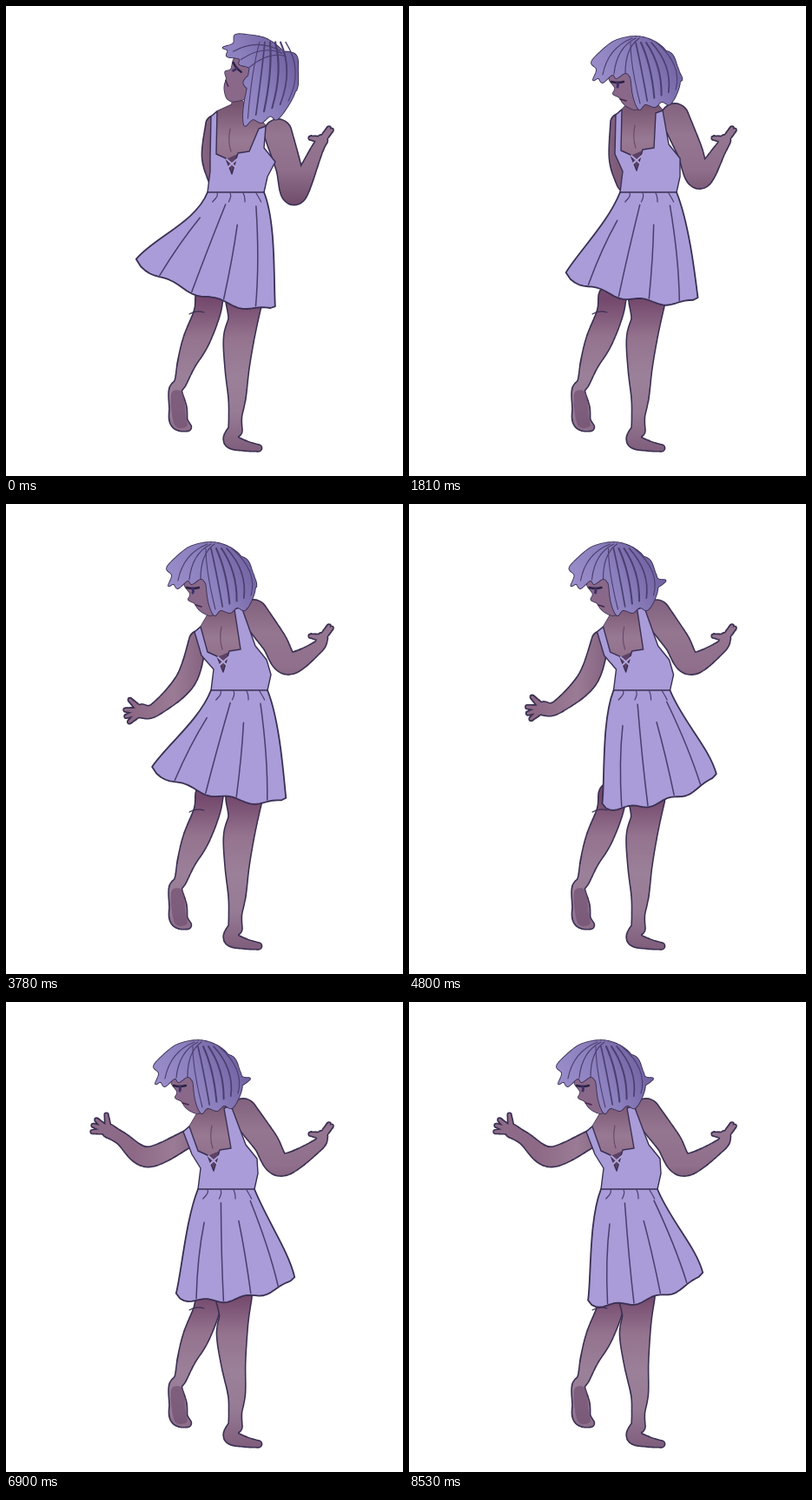
Animation, 457 px wide and 540 px high, one loop 8660 ms. Source, as an HTML page with a canvas:

```html
<!DOCTYPE html>
<html lang="en">
<head>
<meta charset="utf-8">
<title>Turning dancer</title>
<style>
html, body { margin: 0; width: 100%; height: 100%; overflow: hidden; background: #fff; }
canvas { display: block; width: 457px; height: 540px; }
</style>
</head>
<body>
<canvas id="stage" width="457" height="540"></canvas>
<script>
const ctx = document.getElementById('stage').getContext('2d');
const LOOP = 8660, HOLD = 130, STEP = 82.8, SWAY = 1828;
const INK = '#3a2f52', DRESS = '#a99cd8', FOLD = '#4a3d6d';

// Key joints in four poses: back turned, shoulder raised, arm out low, arm out high
const joints = {
  head: [[292, 84], [267, 76], [242, 85], [227, 85]],
  strapL: [[236, 127], [238, 125], [217, 147], [204, 149]],
  strapR: [[299, 138], [292, 120], [271, 118], [259, 119]],
  notch: [[260, 193], [262, 189], [250, 193], [239, 194]],
  waist: [[264, 214], [275, 214], [268, 214], [253, 215]],
  elbowL: [[237, 172], [242, 175], [207, 202], [163, 178]],
  wristL: [[240, 198], [246, 202], [172, 236], [133, 157]],
  palmL: [[244, 203], [250, 206], [156, 238], [118, 148]],
  elbowR: [[333, 215], [335, 197], [325, 183], [317, 187]]
};
const turns = [[130, 930], [1950, 2533], [4670, 5550]];

const lerp = (a, b, k) => a + (b - a) * k;
const along = (a, b, k) => a.map((v, i) => lerp(v, b[i], k));
const shift = ([x, y], dx, dy) => [x + dx, y + dy];
const polar = ([x, y], angle, r) => [x + r * Math.cos(angle), y + r * Math.sin(angle)];
const heading = (a, b) => Math.atan2(b[1] - a[1], b[0] - a[0]);
const clamp = v => Math.min(1, Math.max(0, v));
const ease = (t, [a, b]) => { const k = clamp((t - a) / (b - a)); return k * k * (3 - 2 * k); };

function poseAt(t) {
  const turn = turns.reduce((sum, span) => sum + ease(t, span), 0);
  const i = Math.min(2, Math.floor(turn));
  const pose = { turn };
  for (const name in joints) pose[name] = along(joints[name][i], joints[name][i + 1], turn - i);
  return pose;
}

// -1 blows the skirt fully left, 1 fully right; a first gust dies away
const swayAt = t => .28 - .85 * Math.cos(2 * Math.PI * (t / SWAY - .083)) - .55 * Math.exp(-t / 400);

const spline = (a, b, c, d, k) =>
  b + k * (c - a + k * (2 * a - 5 * b + 4 * c - d + k * (3 * (b - c) + d - a))) / 2;

function blob(p) {
  const path = new Path2D(), n = p.length;
  const at = i => p[(i + n) % n];
  p.forEach((_, i) => {
    for (let k = 0; k < 1; k += .1) {
      path.lineTo(...[0, 1].map(c => spline(at(i - 1)[c], at(i)[c], at(i + 1)[c], at(i + 2)[c], k)));
    }
  });
  path.closePath();
  return path;
}

function poly(p) {
  const path = new Path2D();
  p.forEach(q => path.lineTo(...q));
  path.closePath();
  return path;
}

function ink(path, width = 1.4, color = INK) {
  ctx.strokeStyle = color;
  ctx.lineWidth = width;
  ctx.stroke(path);
}

function paint(path, fill, width = 1.6) {
  ink(path, width * 2);
  ctx.fillStyle = fill;
  ctx.fill(path);
}

function bend(a, b, c, width, color) {
  const path = new Path2D();
  path.moveTo(...a);
  path.quadraticCurveTo(...b, ...c);
  ink(path, width, color);
}

function shade(x0, y0, x1, y1, ...colors) {
  const g = ctx.createLinearGradient(x0, y0, x1, y1);
  colors.forEach((c, i) => g.addColorStop(i / (colors.length - 1), c));
  return g;
}

// Union of round tubes; each joint is x, y, radius
function limb(chains, fill) {
  [[.9, INK], [-.7, fill]].forEach(([grow, color]) => {
    const path = new Path2D();
    for (const chain of chains) {
      const at = i => chain[Math.min(chain.length - 1, Math.max(0, i))];
      for (let i = 0; i < chain.length - 1; i++) {
        for (let k = 0; k <= 1; k += .04) {
          const [x, y, r] = [0, 1, 2].map(c =>
            spline(at(i - 1)[c], at(i)[c], at(i + 1)[c], at(i + 2)[c], k));
          path.moveTo(x + r + grow, y);
          path.arc(x, y, r + grow, 0, 7);
        }
      }
    }
    ctx.fillStyle = color;
    ctx.fill(path);
  });
}

const fingers = (palm, angle, fan, reach) =>
  fan.map(f => [[...palm, 4], [...polar(palm, angle + f, reach), 2.2]]);

function drawLegs({ turn }) {
  const skin = shade(0, 338, 0, 510, '#74496d', '#94738e', '#9b8099', '#977b95', '#7f5e7c');
  limb([[[234, 335, 16], [231, 354, 15], [219, 384, 15], [208, 410, 10.5], [201, 432, 7],
    [195, 442, 7.5], [198, 462, 10], [199, 477, 10], [209, 484, 4.5]]], skin);
  const sole = [[190, 446], [203, 444], [207, 470], [208, 483], [194, 481]];
  ctx.fillStyle = '#6c4a6d99';
  ctx.fill(blob(sole));

  const step = 12 * clamp(turn - 2);
  const lean = ([x, y, r]) => [x - step * clamp((455 - y) / 110), y, r];
  const leg = [[274, 338, 21], [273, 360, 17], [268, 382, 17.5], [266, 415, 14], [266, 450, 10],
    [264, 472, 7.5], [264, 488, 8]];
  limb([leg.map(lean), [[264, 485, 7], [259, 499, 8.5], [274, 505, 6], [291, 508, 3.8]]], skin);
  bend([211, 354], [219, 349], [228, 352], 1.1);
}

function drawArms({ strapL, elbowL, wristL, palmL, strapR, elbowR, notch }) {
  const skinL = shade(100, 0, 240, 0, '#8d6c89', '#8d6986', '#9a7b95', '#7d5b79');
  limb([
    [[...shift(strapL, 4, 9), 10], [...elbowL, 11.5], [...wristL, 7.5], [...palmL, 8]],
    ...fingers(palmL, heading(wristL, palmL), [-.6, -.2, .2, .9], 19)
  ], skinL);

  const corner = shift(notch, 20, -26);
  const back = [strapL, shift(strapL, 7, -6), shift(along(strapL, strapR, .38), 0, -18),
    shift(along(strapL, strapR, .4), 0, -32), shift(along(strapL, strapR, .8), 0, -14), strapR,
    corner, notch, shift(notch, -18, -22)];
  paint(poly(back), shade(0, 112, 0, 195, '#76536f', '#987994', '#8a6883'), .7);
  bend(shift(notch, -2, -52), shift(notch, -5, -38), shift(notch, -1, -26), 1.2, '#6a4a6b');

  const wrist = [358, 165], palm = [364, 154];
  const skinR = shade(0, 108, 0, 228, '#80607c', '#957691', '#8f6f8b', '#704d6b');
  limb([
    [[...shift(strapR, 14, 8), 16], [...along(shift(strapR, 16, 8), elbowR, .55), 14.5],
      [...elbowR, 13], [...wrist, 7], [...palm, 6.5]],
    ...fingers(palm, heading(wrist, palm), [.02, .25], 16),
    ...fingers(palm, heading(wrist, palm), [-1.9], 14)
  ], skinR);
}

function drawSkirt({ waist }, sway) {
  const k = (sway + 1) / 2, [wx, wy] = waist;
  const wl = wx - 32, wr = wx + 33;
  const [lx, ly] = along([wl - 82, 291], [wl - 17, 341], k);
  const [rx, ry] = along([wr + 13, 345], [wr + 51, 312], k);
  const hem = u => [lerp(lx, rx, u),
    lerp(ly, ry, u) + 16 * Math.sqrt(Math.sin(Math.PI * u) + 1e-9) + 2.5 * Math.sin(u * Math.PI * 6)];

  const path = new Path2D();
  path.moveTo(wl, wy);
  path.bezierCurveTo(wl - 14, wy + 35, lerp(lx, wl, .25), ly - 25, lx, ly);
  for (let i = 1; i < 30; i++) path.lineTo(...hem(i / 30));
  path.lineTo(rx, ry);
  path.bezierCurveTo(lerp(rx, wr, .15), ry - 30, wr + 14, wy + 35, wr, wy);
  ctx.fillStyle = DRESS;
  ctx.fill(path);
  ink(path, 1.8);

  for (let i = 0; i < 4; i++) {
    const u = .17 + .23 * i, top = [lerp(wl, wr, u), wy], end = hem(u);
    const start = along(top, end, i % 2 ? .12 : .3);
    bend(start, shift(along(top, end, .6), (.5 - u) * -12, 0), shift(end, 0, -2), 1.5, FOLD);
    bend(shift(top, 0, 1), shift(top, 2, 4), shift(top, (u - .5) * 16, 11), 1.2, FOLD);
  }
}

function drawBodice({ strapL, strapR, notch, waist }) {
  const at = (dx, dy) => shift(notch, dx, dy);
  ctx.fillStyle = '#5d4266';
  ctx.fill(poly([at(-7, -17), at(7, -23), notch]));
  const shape = poly([strapL, at(-25, -19), shift(waist, -29, -24), shift(waist, -32, 0),
    shift(waist, 33, 0), shift(waist, 37, -18), at(50, -14), at(37, -30), strapR,
    shift(strapR, -8, 3), at(20, -26), at(7, -24), notch, at(-7, -18), at(-18, -23),
    shift(strapL, 7, -6)]);
  ctx.fillStyle = DRESS;
  ctx.fill(shape);
  ink(shape, 1.4);
  [-1, 1].forEach(side => bend(at(side * 6, -17), at(0, -12), at(side * -4, -8), 1.8, '#b3a6dc'));
}

function drawHead({ head }, sway, up) {
  const tilt = new DOMMatrix().rotate(50 * up);
  const fall = new DOMMatrix([1, 0, -.35 * up, 1 + .25 * up, 0, 0]);
  const flick = clamp((sway + .6) / 1.2);
  const within = (matrix, draw) => {
    ctx.save();
    ctx.transform(matrix.a, matrix.b, matrix.c, matrix.d, 0, 0);
    draw();
    ctx.restore();
  };

  ctx.save();
  ctx.translate(...head);
  within(tilt, () => {
    paint(blob([[-36, 5], [-30, 18], [-32, 25], [-25, 29], [-21, 35], [-15, 40], [-6, 43],
      [2, 37], [9, 15], [-10, -5]]), '#89688a', .8);
    bend([-34, 11], [-27, 13], [-20, 11], 2.4, '#2b2142');
    bend([-27, 12], [-26, 15], [-27, 17], 3, '#3d3168');
    bend([-24, 31], [-20, 32], [-17, 33], 1.5, '#48254b');
  });

  const cap = blob([[-57, -11], [-48, -22], [-30, -36], [-6, -41], [14, -36], [29, -24], [36, -6],
    [28, 10], [-6, 18], [-12, 6], [-18, 1], [-28, 7], [-33, 3], [-44, 12], [-49, 7], [-55, 9], [-51, -3]]);
  const bob = blob([[-12, -20], [30, -24], [42, -6], [45, 10], [41, 25], [33, 37], [24, 34],
    [16, 40], [5, 37], [-2, 43], [-8, 31], [-11, 12]]);
  const lock = blob([[32, -20], [44, 0], [46 + 8 * flick, 9 - 6 * flick], [44, 11], [34, 14]]);
  const hair = new Path2D();
  hair.addPath(cap, tilt);
  hair.addPath(bob, fall);
  hair.addPath(lock, fall);
  paint(hair, shade(-45, 20, 35, -25, '#9a8dca', '#8c7fbd', '#7263a2'), .9);

  within(fall, () => {
    for (let u = 0; u <= 1; u += .2) {
      bend([lerp(-12, 18, u), -34], [lerp(-12, 48, u), -8], [lerp(-1, 40, u), lerp(36, 20, u)],
        1.1 + Math.sin(u * Math.PI), '#4b3f70');
    }
  });
  within(tilt, () => {
    for (let i = 0; i < 3; i++) {
      bend([-10 + 4 * i, -39], [-38 + 10 * i, -28], [-44 + 13 * i, 3 - i], 1.2, '#4b3f70');
    }
  });
  ctx.restore();
}

function draw(t) {
  ctx.fillStyle = '#fff';
  ctx.fillRect(0, 0, 457, 540);
  ctx.lineJoin = ctx.lineCap = 'round';
  const pose = poseAt(t), sway = swayAt(t);
  drawLegs(pose);
  drawArms(pose);
  drawSkirt(pose, sway);
  drawBodice(pose);
  drawHead(pose, sway, 1 - ease(t, [130, 730]));
}

// Each drawing is held for one step, the first a little longer
const held = t => t < HOLD ? 0 : HOLD + Math.floor((t - HOLD) / STEP) * STEP;

function tick(now) {
  draw(held(now % LOOP));
  requestAnimationFrame(tick);
}
draw(0);
requestAnimationFrame(tick);
</script>
</body>
</html>
```
